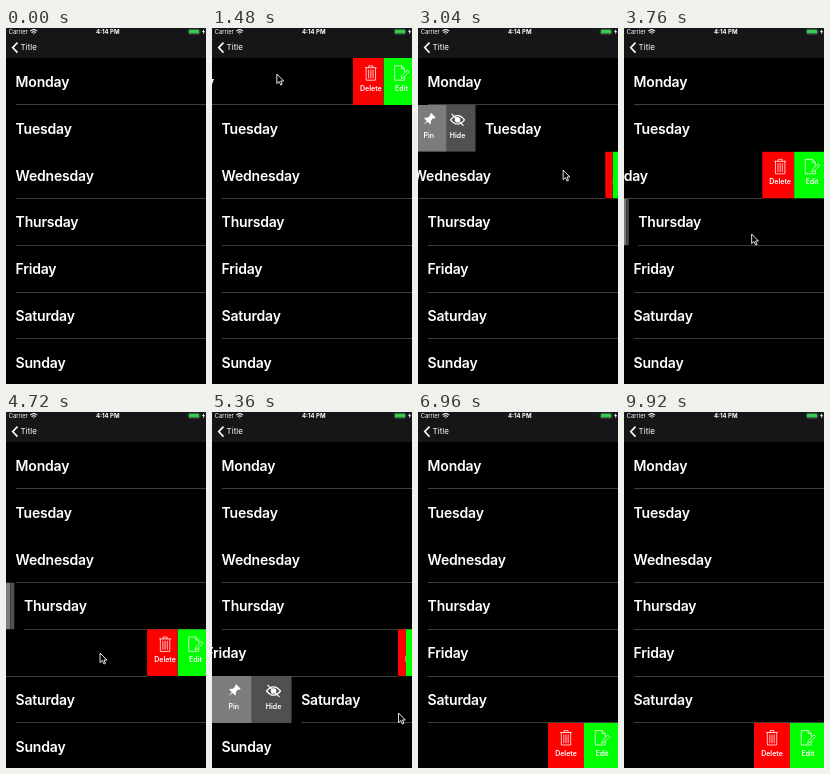
Animation of 200 by 356 pixels, one loop 10000 ms. Source, as an HTML page:

```html
<!DOCTYPE html>
<html lang="en">
<head>
<meta charset="utf-8">
<title>Swipe actions</title>
<style>
  html, body { margin: 0; width: 100%; height: 100%; overflow: hidden; background: #000; }
  svg { display: block; }
  #stage { width: 100vw; height: 100vh; }
  #stage svg { overflow: hidden; }
  text { font-family: Inter, Roboto, sans-serif; fill: #fff; }
  .day { font-size: 14px; font-weight: 600; letter-spacing: -.2px; }
  .action { font-size: 7px; font-weight: 600; text-anchor: middle; }
  .line { fill: none; stroke: #fff; stroke-width: .75; stroke-linejoin: round; stroke-linecap: round; }
</style>
</head>
<body>
<svg id="stage" viewBox="0 0 200 356">
  <rect width="200" height="356" fill="#000"/>
  <g id="rows"></g>
  <rect width="200" height="30" fill="#161618"/>
  <text x="2.8" y="6.2" font-size="5.8">Carrier</text>
  <g fill="none" stroke="#fff" stroke-width="1.1">
    <path d="M24.3 3.1Q27.7 .2 31.1 3.1M25.6 4.7Q27.7 2.9 29.8 4.7"/>
    <path d="M26.8 5.4H28.6L27.7 6.5Z" fill="#fff" stroke="none"/>
    <path d="M11.5 14.6L6.7 19.6L11.5 24.6" stroke-width="1.6"/>
  </g>
  <text x="101.7" y="6.2" font-size="6" font-weight="700" text-anchor="middle">4:14 PM</text>
  <rect x="182.2" y="1.1" width="11.6" height="5.2" rx="1.4" fill="#161618" stroke="#66756a" stroke-width=".5"/>
  <rect x="183" y="1.8" width="10" height="3.8" rx=".7" fill="#35d04f"/>
  <path d="M194.6 2.8Q195.5 3.7 194.6 4.6Z" fill="#66756a"/>
  <path d="M198.2 1L196 4.1H197.4L196.9 6.5L199.2 3.2H197.8Z" fill="#fff"/>
  <text x="14.6" y="22.3" font-size="8">Title</text>
  <path id="cursor" d="M0 0V9.6L2.3 7.5L3.9 11L5.4 10.3L3.9 7H6.8Z"
        fill="#000" stroke="#fff" stroke-width=".9" stroke-linejoin="round"/>
</svg>
<script>
// The list runs slightly past the right side of the stage
const LOOP = 10000, WIDTH = 72, EDGE = 202, ROW = 46.8, TOP = 30, INSET = 18, CLOSE = 420;

// Each swipe: start and length in ms, reach, direction, pointer start
const swipes = [
  { day: 'Monday',    at: 1040, len: 600, reach: 74, dir: -1, x: 126, y: 46 },
  { day: 'Tuesday',   at: 2060, len: 390, reach: 81, dir: 1,  x: 86,  y: 92 },
  { day: 'Wednesday', at: 2920, len: 420, reach: 74, dir: -1, x: 160, y: 142 },
  { day: 'Thursday',  at: 3673, len: 600, reach: 80, dir: 1,  x: 123, y: 206 },
  { day: 'Friday',    at: 4390, len: 440, reach: 72, dir: -1, x: 155, y: 241 },
  { day: 'Saturday',  at: 5070, len: 360, reach: 88, dir: 1,  x: 107, y: 301 },
  { day: 'Sunday',    at: 5980, len: 500, reach: 74, dir: -1, x: 180, y: 334 }
];

// Icons are centred on the origin
const icons = {
  Pin: `<path transform="rotate(45)" fill="#fff"
    d="M-3.2 -6.5H3.2V-5L2.1 -4.2V-1L4.2 1.2V2.2H.6L0 7.5L-.6 2.2H-4.2V1.2L-2.1 -1V-4.2L-3.2 -5Z"/>`,
  Hide: `<g class="line" style="stroke-width:1.2"><path d="M-7 0Q0 -8.4 7 0Q0 8.4 -7 0Z"/>
    <circle r="2.2" fill="#fff"/><path d="M-5.6 -5.6L5.6 5.6"/></g>`,
  Delete: `<g class="line"><path d="M-5.5 -5.3H5.5M-2 -5.3V-7.2H2V-5.3M-4.7 -5.3V7.2H4.7V-5.3
    M-2.2 -3V5M0 -3V5M2.2 -3V5"/></g>`,
  Edit: `<g class="line"><path d="M3.2 4V7.2H-6.8V-7.2H.2L3.2 -4.2V-1.5M.2 -7.2V-4.2H3.2
    M-.3 5.2L.5 2.6L6 -2.9L7.7 -1.2L2.2 4.3Z"/></g>`
};

const button = (name, color) => `<svg height="47"><rect width="200" height="47" fill="${color}"/>
  <g><g transform="translate(0 15)">${icons[name]}</g><text class="action" y="32.8">${name}</text></g></svg>`;

const rowTop = i => TOP + ROW * i;
const hasLine = i => i !== 1 && i < 6;

document.getElementById('rows').innerHTML = swipes.map((s, i) => {
  const top = rowTop(i);
  const lineY = Math.floor(rowTop(i + 1)) - top;
  const line = hasLine(i) ? `<rect x="10" y="${lineY}" width="${EDGE - 10}" height="1" fill="#3e3e40"/>` : '';
  const buttons = s.dir > 0
    ? button('Pin', '#7c7c7c') + button('Hide', '#505050')
    : button('Delete', '#f00') + button('Edit', '#0f0');
  return `<g transform="translate(0 ${top})"><g class="cell">
    <text class="day" x="9.6" y="29.1">${s.day}</text>${line}</g>${buttons}</g>`;
}).join('');

swipes.forEach((s, i) => {
  const row = document.getElementById('rows').children[i];
  s.cell = row.children[0];
  s.buttons = [row.children[1], row.children[2]];
});
const cursor = document.getElementById('cursor');

const mix = (a, b, p) => a + (b - a) * p;
const ease = (t, from, to) => {
  const p = Math.min(1, Math.max(0, (t - from) / (to - from)));
  return p * p * (3 - 2 * p);
};

function openWidth(i, t) {
  const s = swipes[i], next = swipes[i + 1], end = s.at + s.len;
  const drag = ease(t, s.at, end) * mix(s.reach, WIDTH, ease(t, end, end + 200));
  return next ? drag * (1 - ease(t, next.at, next.at + CLOSE)) : drag;
}

// Pointer stops: entry, both ends of every swipe, exit
const stops = [[480, 46, 110], [840, 126, 46]];
for (const s of swipes) {
  stops.push([s.at, s.x, s.y], [s.at + s.len, s.x + s.dir * s.reach, s.y]);
}
stops.push([6850, 96, 362]);

function drawCursor(t) {
  const n = stops.findIndex(stop => stop[0] > t);
  const shown = n > 0;
  cursor.setAttribute('visibility', shown ? 'visible' : 'hidden');
  if (!shown) return;
  const [t0, x0, y0] = stops[n - 1], [t1, x1, y1] = stops[n];
  const p = ease(t, t0, t1);
  cursor.setAttribute('transform', `translate(${mix(x0, x1, p)} ${mix(y0, y1, p)})`);
}

function draw(t) {
  swipes.forEach((s, i) => {
    const w = openWidth(i, t), half = w / 2;
    s.cell.setAttribute('transform', `translate(${s.dir * w} 0)`);
    s.buttons.forEach((b, k) => {
      b.setAttribute('x', (s.dir > 0 ? 0 : EDGE - w) + k * half);
      b.setAttribute('width', half);
      b.lastElementChild.setAttribute('transform', `translate(${s.dir > 0 ? half - INSET : INSET} 0)`);
    });
  });
  drawCursor(t);
}

const begin = performance.now();
function tick() {
  draw((performance.now() - begin) % LOOP);
  requestAnimationFrame(tick);
}
tick();
</script>
</body>
</html>
```
